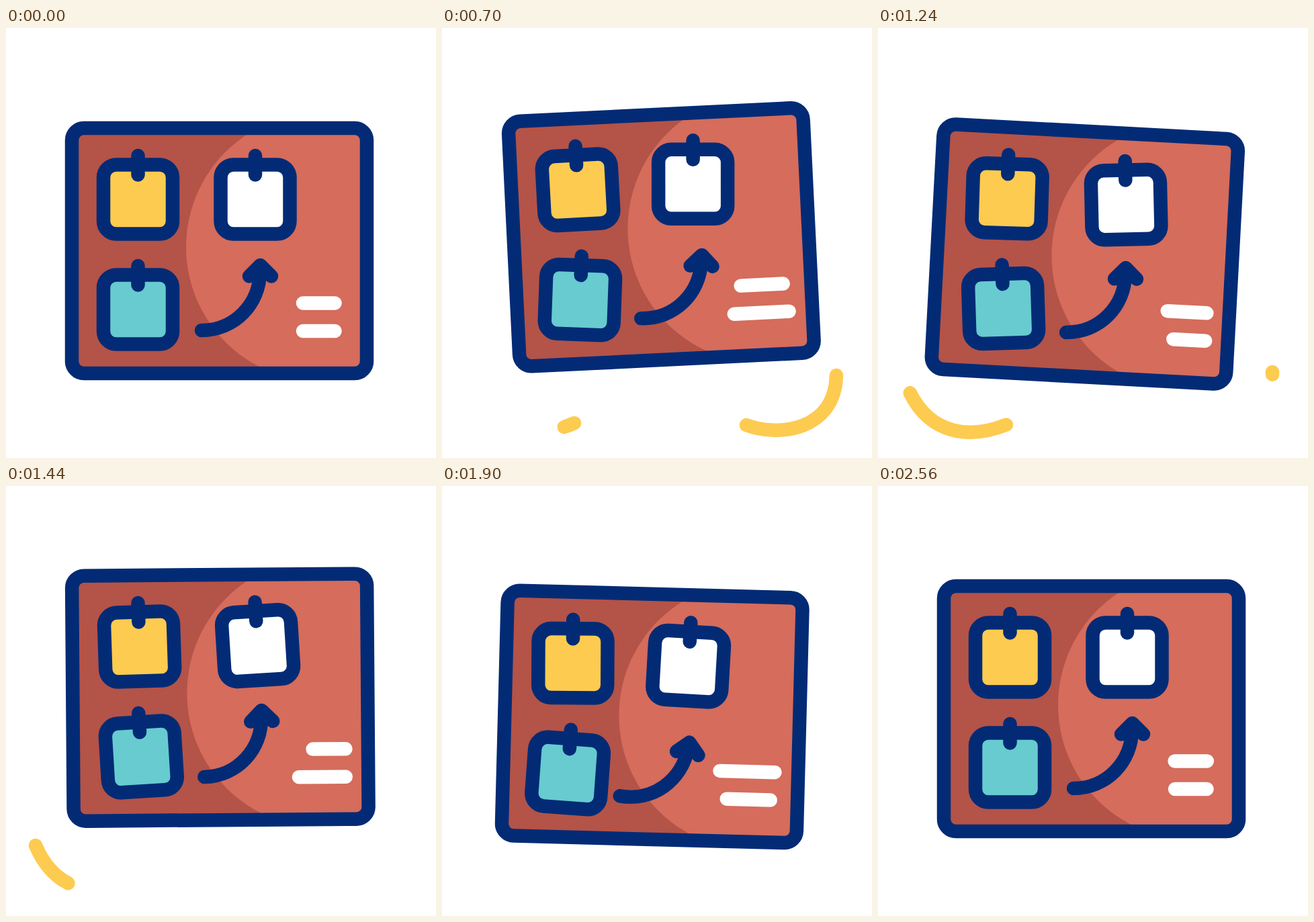
An HTML page for the animation above (2760 ms loop, 640 by 640 pixels).

```html
<!DOCTYPE html>
<html lang="en">
<head>
<meta charset="utf-8">
<title>Pin board</title>
<style>
  html, body { margin: 0; width: 100%; height: 100%; overflow: hidden; background: #fff; }
  svg { display: block; width: 100%; height: 100%; stroke-width: 20.5; stroke-linecap: round; stroke-linejoin: round; }
  .ink { stroke: #032b75; }
  .mark { stroke: #fdcb50; fill: none; }
  .text { stroke: #fff; }
</style>
</head>
<body>
<svg viewBox="0 0 640 640">
  <defs>
    <clipPath id="inside"><rect x="98" y="149" width="439" height="365" rx="18"/></clipPath>
    <g id="note" class="ink">
      <rect x="145" y="203.5" width="103" height="103" rx="19"/>
      <path d="M196.5 190V218.5"/>
    </g>
  </defs>
  <path id="rightArc" class="mark" pathLength="1" d="M453 591C500 609 588 600 587 512"/>
  <path id="leftArc" class="mark" pathLength="1" d="M197 588C140 613 75 608 44 535"/>
  <g id="rays"></g>
  <g id="board">
    <g clip-path="url(#inside)">
      <path fill="#b45348" d="M98 149H537V514H98Z"/>
      <circle cx="468" cy="326" r="200" fill="#d56c5c"/>
    </g>
    <rect class="ink" x="98" y="149" width="439" height="365" rx="18" fill="none"/>
    <use id="yellow" href="#note" fill="#fdcb50"/>
    <use id="white" href="#note" fill="#fff"/>
    <use id="teal" href="#note" fill="#67cbd0"/>
    <g id="arrow" class="ink">
      <path fill="none" d="M291 450C340 450 378 411 378 362"/>
      <path fill="#032b75" d="M362 369.5L378.5 353L395 369.5"/>
    </g>
    <line id="upperLine" class="text" y1="409.5" y2="409.5"/>
    <line id="lowerLine" class="text" y1="451" y2="451"/>
  </g>
</svg>
<script>
const LOOP = 2760;
const BEAT = 412;
const $ = id => document.getElementById(id);

// Three rays fan out around the top right corner
for (const angle of [13, 45, 77]) {
  $('rays').innerHTML +=
    `<path class="mark" pathLength="1" d="M525 97V77" transform="rotate(${angle} 525 155)"/>`;
}

// Eased progress from 0 to 1
function ease(t, start, duration) {
  const u = Math.min(1, Math.max(0, (t - start) / duration));
  return (1 - Math.cos(Math.PI * u)) / 2;
}

// Rises to the first peak, reaches another peak on every beat, then rests at 0
function sway(t, start, rise, ...peaks) {
  let value = peaks[0] * ease(t, start, rise);
  peaks.forEach((peak, i) => {
    const next = peaks[i + 1] || 0;
    value += (next - peak) * ease(t, start + rise + i * BEAT, BEAT);
  });
  return value;
}

function trim(path, head, tail) {
  path.style.display = head - tail > 0.001 ? '' : 'none';
  path.setAttribute('stroke-dasharray', `${head - tail} 2`);
  path.setAttribute('stroke-dashoffset', -tail);
}

function place(id, dx, dy, angle, pivot) {
  $(id).setAttribute('transform', `translate(${dx} ${dy}) rotate(${-angle} ${pivot})`);
}

function stretch(line, t) {
  line.setAttribute('x1', 442 + sway(t, 300, 500, -24, 14, -24, -6));
  line.setAttribute('x2', 489.5 + sway(t, 300, 500, 14, 14, 14, 5));
}

function draw(t) {
  const lift = sway(t, 200, 500, -20, 12.5, -20, 12.5);
  const tilt = sway(t, 305, 500, 3.1, -3.1, 3.1, -3.1);
  place('board', 0, lift, tilt, '317.5 149');

  const pin = '196.5 204';
  place('yellow', 0, 0, sway(t, 400, 500, 0.5, 1.3, 2), pin);
  place('white', 174.5, 0, sway(t, 400, 500, -4.2, 5, -3.2, 0.5), pin);
  place('teal', 0, 164, sway(t, 400, 500, -7.4, 5.8, -6.2, 2.8), pin);
  place('arrow', 0, 0, sway(t, 200, 300, 5.3, -15.2, 4.3, -13.5), '277 331');

  stretch($('upperLine'), t - 180);
  stretch($('lowerLine'), t);

  trim($('rightArc'), ease(t, 360, 380), ease(t, 730, 560));
  trim($('leftArc'), ease(t, 545, 810), ease(t, 1185, 460));
  for (const ray of $('rays').children) trim(ray, ease(t, 2180, 220), ease(t, 2340, 210));
}

function frame(now) {
  draw(now % LOOP);
  requestAnimationFrame(frame);
}
requestAnimationFrame(frame);
</script>
</body>
</html>
```
